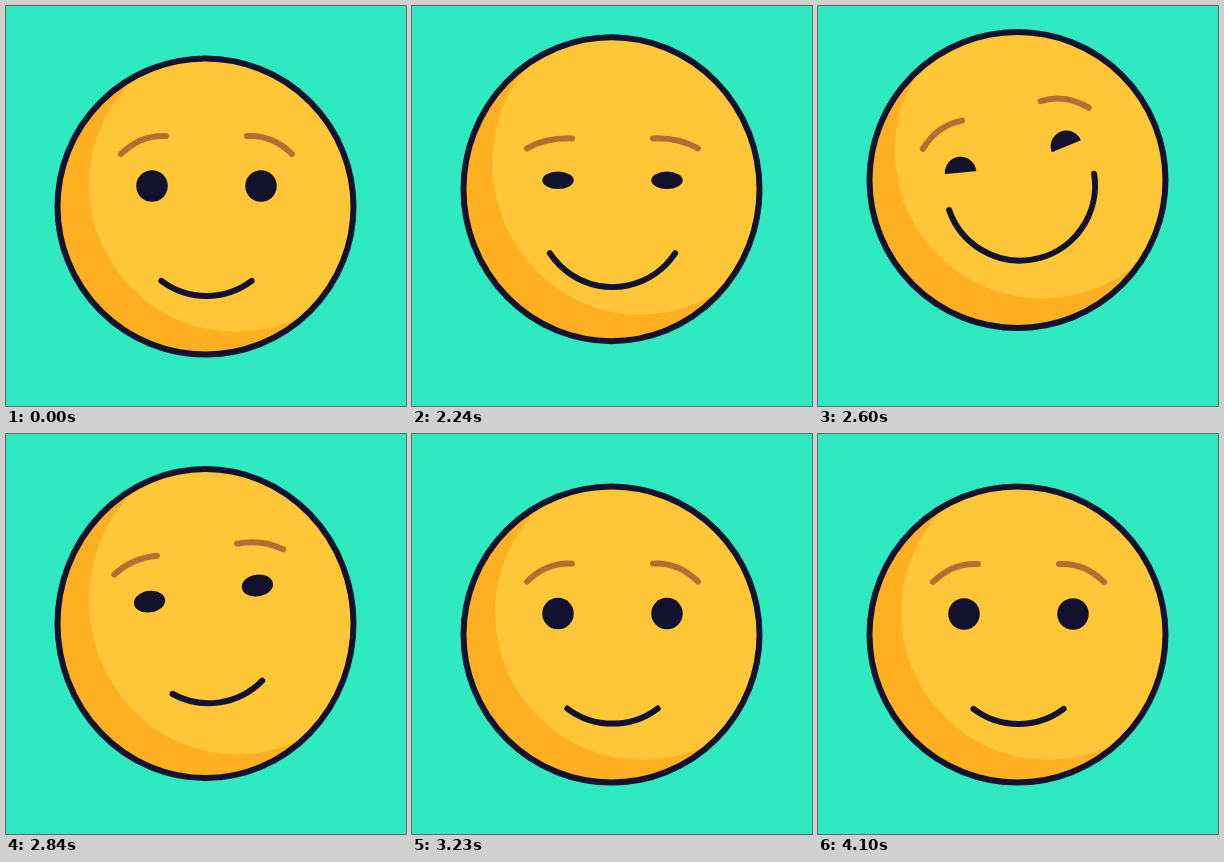
Recreate the animation shown at these times as an HTML page with a canvas. Size 400 px wide and 400 px high, loop 5180 ms.

```html
<!DOCTYPE html>
<html lang="en">
<head>
<meta charset="utf-8">
<title>Smiling face</title>
<style>
  html, body { margin: 0; width: 100%; height: 100%; overflow: hidden; background: #2feac0; }
  canvas { display: block; width: 100%; height: 100%; }
</style>
</head>
<body>
<canvas id="stage" width="400" height="400"></canvas>
<script>
const ctx = document.getElementById('stage').getContext('2d');
const LOOP = 5180, STEP = 30, START = 2030;
const BG = '#2feac0', SKIN = '#ffc638', SHADE = '#ffaf22', INK = '#12122f', BROW = '#b56d33';
const CX = 199.5, CY = 200.5, R = 148, MID = 200.5;
const RAD = Math.PI / 180;

const inOut = u => u < 0.5 ? 2 * u * u : 1 - 2 * (1 - u) * (1 - u);
const out4 = u => 1 - (1 - u) ** 4;
const in3 = u => u ** 3;

// keys: [time, value, ease into this key]
function track(keys) {
  return t => {
    if (t <= keys[0][0]) return keys[0][1];
    for (let i = 1; i < keys.length; i++) {
      const [t1, v1, ease = inOut] = keys[i];
      if (t < t1) {
        const [t0, v0] = keys[i - 1];
        return v0 + (v1 - v0) * ease((t - t0) / (t1 - t0));
      }
    }
    return keys[keys.length - 1][1];
  };
}

const jump = track([[2000, 0], [2110, 14], [2540, -27, out4], [2600, -26.5], [2930, 14, in3], [3080, -1], [3230, 0]]);
const stretch = track([[2000, 0], [2110, -6.5], [2240, 4], [2480, 0], [2600, 0], [2840, 6.5], [2930, -6.5], [3110, 1.5], [3230, 0]]);
const tilt = track([[2140, 0], [2350, -14], [2660, -14], [2840, 0]]);
const smile = track([[2120, 0], [2385, 1], [2610, 1], [2850, 0]]);
const lid = track([[2240, 18], [2440, 0], [2640, 0], [2900, 18]]);
const blinkKeys = t => [[t, 1], [t + 120, 0.1], [t + 150, 0.1], [t + 270, 1]];
const blink = track([2180, 2620, 3830].flatMap(blinkKeys));

function disc(x, y, r, color) {
  ctx.beginPath();
  ctx.arc(x, y, r, 0, 2 * Math.PI);
  ctx.fillStyle = color;
  ctx.fill();
}

function drawHead(t) {
  const y = CY + jump(t), ry = R + stretch(t);
  ctx.save();
  ctx.beginPath();
  ctx.ellipse(CX, y, R, ry, 0, 0, 2 * Math.PI);
  ctx.clip();
  ctx.translate(CX, y);
  ctx.scale(1, ry / R);
  ctx.rotate(tilt(t) * RAD);
  disc(0, 0, R + 2, SHADE);
  disc(31, -22, 147.5, SKIN);
  ctx.restore();
  ctx.beginPath();
  ctx.ellipse(CX, y, R, ry, 0, 0, 2 * Math.PI);
  ctx.strokeStyle = INK;
  ctx.stroke();
}

function drawEye(side, open, cut) {
  ctx.save();
  ctx.translate(MID + side * 54.5, 180);
  ctx.scale(1, open);
  if (cut < 18) {
    ctx.rotate(-side * 8.5 * RAD);
    ctx.beginPath();
    ctx.rect(-30, -40, 60, 40 + cut);
    ctx.clip();
  }
  disc(0, 0, 15.75, INK);
  ctx.restore();
}

function drawBrow(side, open) {
  const y = h => 148 - h * open;
  ctx.beginPath();
  ctx.moveTo(MID + side * 85.5, y(0));
  ctx.quadraticCurveTo(MID + side * 66, y(19.5), MID + side * 40.5, y(18));
  ctx.strokeStyle = BROW;
  ctx.stroke();
}

function drawFace(t) {
  const open = blink(t), s = smile(t), half = (37 + 48 * s) * RAD;
  ctx.save();
  ctx.translate(CX, CY + jump(t - 65));
  ctx.rotate(tilt(t - 100) * RAD);
  ctx.translate(-CX, -CY);
  for (const side of [-1, 1]) {
    drawBrow(side, open);
    drawEye(side, open, lid(t));
  }
  ctx.beginPath();
  ctx.arc(MID, 215 - 8 * s, 75, Math.PI / 2 - half, Math.PI / 2 + half);
  ctx.strokeStyle = INK;
  ctx.stroke();
  ctx.restore();
}

function draw() {
  const now = performance.now() % LOOP;
  const t = START + Math.floor((now - START) / STEP) * STEP;
  ctx.fillStyle = BG;
  ctx.fillRect(0, 0, 400, 400);
  ctx.lineWidth = 6;
  ctx.lineCap = 'round';
  drawHead(t);
  drawFace(t);
  requestAnimationFrame(draw);
}
draw();
</script>
</body>
</html>
```
